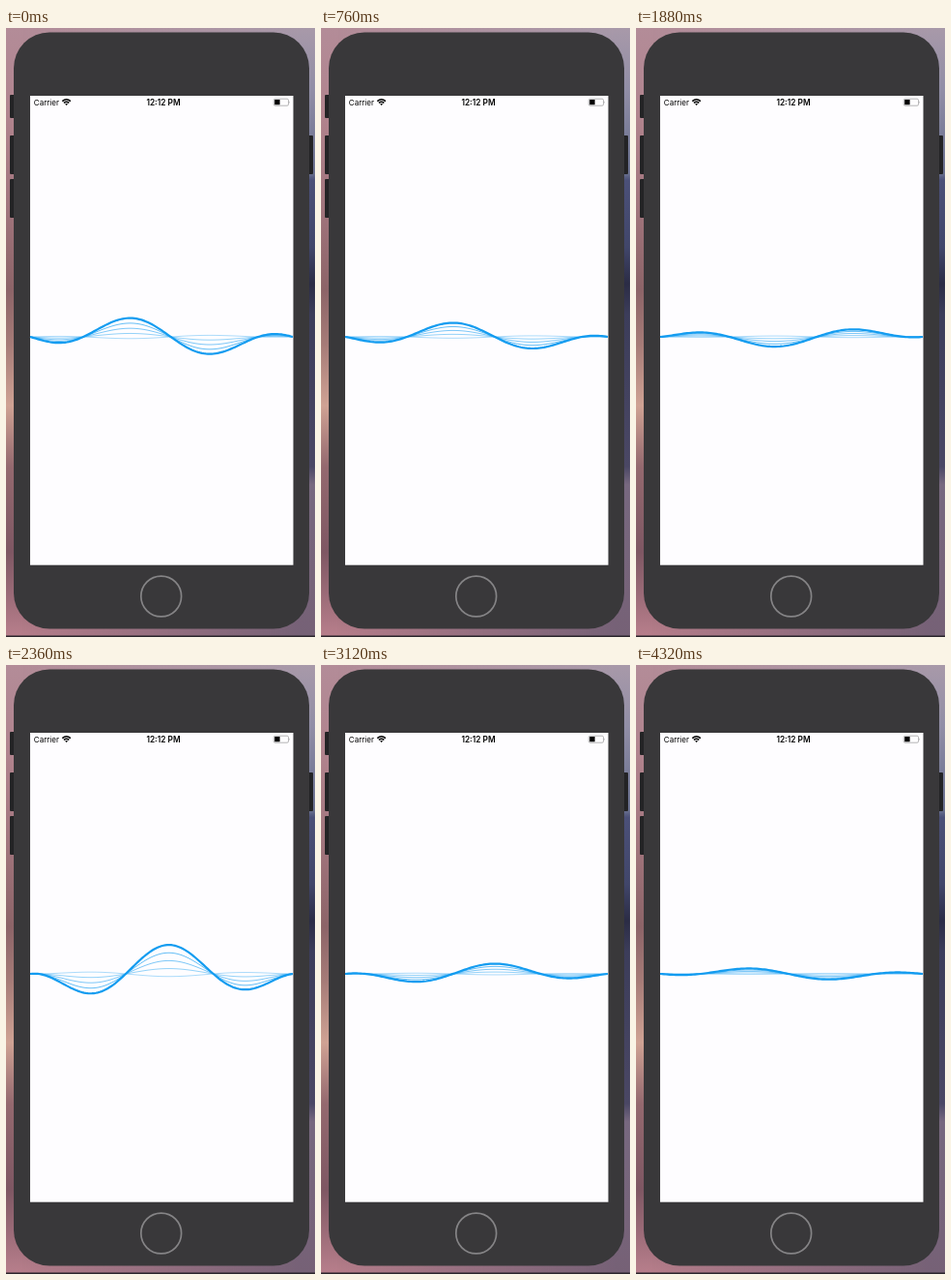
An HTML page that plays this animation: 320x629 px, repeating every 4360 ms.

```html
<!DOCTYPE html>
<html lang="en">
<head>
<meta charset="utf-8">
<title>Voice wave</title>
<style>
  html, body { margin: 0; width: 100%; height: 100%; overflow: hidden; background: #39383a; }
  svg { display: block; width: 320px; height: 629px; }
  text { font-family: Inter, Roboto, sans-serif; fill: #000; }
</style>
</head>
<body>
<svg viewBox="0 0 320 629">
  <defs>
    <linearGradient id="left" x2="0" y2="1">
      <stop offset="0" stop-color="#b38c98"/>
      <stop offset=".15" stop-color="#b0838d"/>
      <stop offset=".3" stop-color="#a0747c"/>
      <stop offset=".43" stop-color="#8c6468"/>
      <stop offset=".52" stop-color="#a67c78"/>
      <stop offset=".62" stop-color="#cfa294"/>
      <stop offset=".72" stop-color="#94696f"/>
      <stop offset=".86" stop-color="#7e5763"/>
      <stop offset="1" stop-color="#b87f8c"/>
    </linearGradient>
    <linearGradient id="right" x2="0" y2="1">
      <stop offset="0" stop-color="#a899a9"/>
      <stop offset=".1" stop-color="#918ea6"/>
      <stop offset=".24" stop-color="#666d8c"/>
      <stop offset=".25" stop-color="#4b5078"/>
      <stop offset=".36" stop-color="#41466a"/>
      <stop offset=".42" stop-color="#2b2c45"/>
      <stop offset=".47" stop-color="#3c3d5a"/>
      <stop offset=".72" stop-color="#4a4764"/>
      <stop offset=".75" stop-color="#77687f"/>
      <stop offset="1" stop-color="#766176"/>
    </linearGradient>
    <linearGradient id="fade">
      <stop offset=".05" stop-color="#fff" stop-opacity="0"/>
      <stop offset=".95" stop-color="#fff"/>
    </linearGradient>
    <mask id="blend"><rect width="320" height="629" fill="url(#fade)"/></mask>
  </defs>

  <rect width="320" height="629" fill="url(#left)"/>
  <rect width="320" height="629" fill="url(#right)" mask="url(#blend)"/>
  <rect y="627.5" width="320" height="1.5" fill="#29242b"/>

  <g fill="#232325">
    <rect x="4" y="69" width="6" height="24" rx="1"/>
    <rect x="4" y="111" width="6" height="40" rx="1"/>
    <rect x="4" y="156" width="6" height="40" rx="1"/>
    <rect x="312" y="111" width="6" height="40" rx="1"/>
  </g>
  <rect x="8" y="4.5" width="306" height="616" rx="37" fill="#39383a"/>
  <circle cx="160.7" cy="587" r="20.9" fill="none" stroke="#858486" stroke-width="1.7"/>
  <rect x="25" y="70" width="272.5" height="484.7" fill="#fefdff"/>

  <text x="28.8" y="80" font-size="8">Carrier</text>
  <text x="163" y="80" font-size="8.3" font-weight="600" text-anchor="middle">12:12 PM</text>
  <g fill="none" stroke="#000" stroke-width="1.5">
    <path d="M58.3 75.6Q62.6 71.8 66.9 75.6M59.9 77.4Q62.6 75 65.3 77.4"/>
    <path d="M61.1 78.5L62.6 80.1L64.1 78.5Q62.6 77.3 61.1 78.5Z" fill="#000" stroke="none"/>
  </g>
  <rect x="277.3" y="73.2" width="15.2" height="7" rx="1.4" fill="none" stroke="#959597" stroke-width=".7"/>
  <rect x="278.2" y="74.1" width="5.4" height="5.2" rx=".5"/>
  <path d="M293.3 75.5q1.3 1.2 0 2.4z" fill="#959597"/>

  <g id="waves" fill="none" stroke="#149cf0"></g>
</svg>
<script>
  const LOOP = 4360, STEP = 40, COUNT = 5;
  const LEFT = 25, WIDTH = 272, MID_Y = 319;

  // Pairs of [ms, value]: distance travelled in px, and peak height in px.
  const travel = [[0, 0], [760, 190.5], [1360, 342], [2360, 588], [3120, 782], [3760, 939], [4320, 1075]];
  const level = [[0, 20.7], [760, 15], [1160, 10.8], [1360, 7.7], [1720, 6.5], [2080, 15], [2280, 29],
    [2320, 32.5], [2360, 30], [2760, 17], [3120, 10.7], [3360, 19], [3400, 20], [3760, 8], [4320, 6.3]];

  function valueAt(keys, t) {
    const i = keys.findIndex(k => k[0] > t);
    if (i < 0) return keys[keys.length - 1][1];
    const [t0, a] = keys[i - 1], [t1, b] = keys[i];
    return a + (b - a) * (t - t0) / (t1 - t0);
  }

  function wavePath(height, shift) {
    let d = "";
    for (let x = 0; x <= WIDTH; x += 2) {
      const envelope = 1 - (2 * x / WIDTH - 1) ** 2;
      const angle = Math.PI * (1 + 3 * (x - 55 - shift) / WIDTH);
      const y = MID_Y + height * envelope * Math.sin(angle);
      d += (x ? "L" : "M") + (LEFT + x) + " " + y.toFixed(2);
    }
    return d;
  }

  const waves = Array.from({ length: COUNT }, (_, i) => {
    const progress = 1 - i / COUNT;
    const path = document.createElementNS("http://www.w3.org/2000/svg", "path");
    path.setAttribute("stroke-width", i ? 0.75 : 2.2);
    path.setAttribute("stroke-opacity", Math.min(1, (2 * progress + 1) / 3));
    document.getElementById("waves").append(path);
    return { path, scale: (1.5 * progress - 0.4) / 1.1 };
  });

  const start = performance.now();
  function draw() {
    const t = Math.floor((performance.now() - start) % LOOP / STEP) * STEP;
    const height = valueAt(level, t), shift = valueAt(travel, t);
    for (const { path, scale } of waves) path.setAttribute("d", wavePath(height * scale, shift));
    requestAnimationFrame(draw);
  }
  draw();
</script>
</body>
</html>
```
